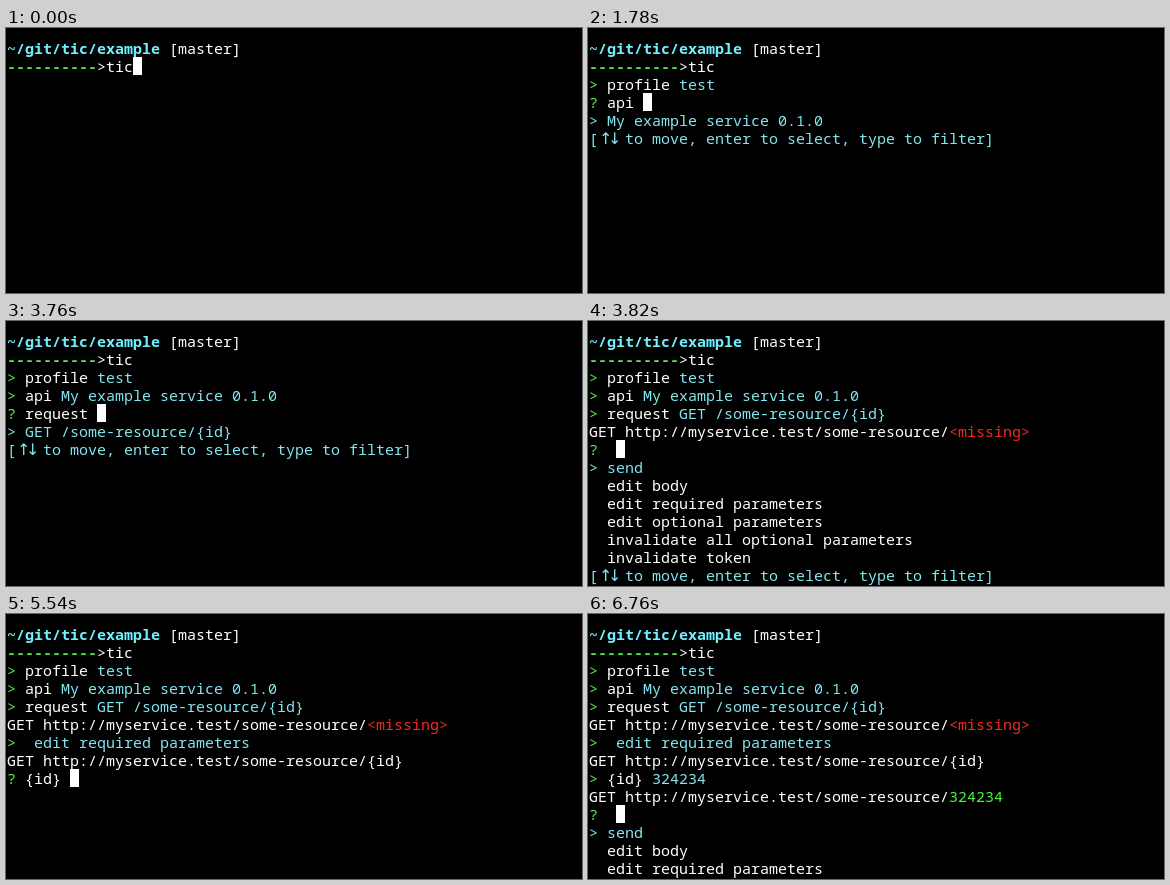
These frames come from a looping animation (576x265 px, 8 s). An HTML page:

```html
<!DOCTYPE html>
<html lang="en">
<head>
<meta charset="utf-8">
<title>Terminal session</title>
<style>
  html, body { margin: 0; width: 100%; height: 100%; overflow: hidden; background: #000; }
  #screen {
    position: absolute; left: 1px; top: 11px; margin: 0;
    font: 500 15px/18px "Noto Sans Mono", "DejaVu Sans Mono", monospace;
    font-variant-ligatures: none; color: #fff; white-space: pre;
  }
  .row { height: 18px; }
  .path { color: #70efff; font-weight: bold; }
  .dash { color: #55f04b; font-weight: bold; }
  .mark { color: #55f04b; }
  .pick { color: #84e6f0; }
  .miss { color: #f52a1e; }
  .value { color: #46f53c; }
  .cursor { display: inline-block; width: 9px; height: 18px; vertical-align: top; background: #fff; }
  .arrow {
    display: inline-block; position: relative; left: 1px; top: 1px;
    width: 9px; height: 18px; vertical-align: top;
    font: 16px/18px "DejaVu Sans", sans-serif;
  }
</style>
</head>
<body>
<pre id="screen"></pre>
<script>
const LOOP = 8000;
const screenEl = document.getElementById("screen");

const escapeText = s => s.replace(/</g, "&lt;").replace(/>/g, "&gt;");
const span = (cls, text = "") => `<span class="${cls}">${escapeText(text)}</span>`;
const cursor = span("cursor");

const asked = (label, answer) => `${span("mark", ">")} ${label} ${span("pick", answer)}`;
const asking = (label, typed = "") => `${span("mark", "?")} ${label} ${typed}${cursor}`;
const list = (items, chosen) => items.map((item, i) =>
  i === chosen ? span("pick", "> " + item) : "  " + item);
const help = span("pick", "[") +
  `<span class="pick">${span("arrow", "↑")}${span("arrow", "↓")}</span>` +
  span("pick", " to move, enter to select, type to filter]");
const url = end => "GET http://myservice.test/some-resource/" + end;

const profiles = ["dev", "test"];
const api = "My example service 0.1.0";
const request = "GET /some-resource/{id}";
const actions = [
  "send", "edit body", "edit required parameters", "edit optional parameters",
  "invalidate all optional parameters", "invalidate token"
];

const shell = [
  span("path", "~/git/tic/example") + " [master]",
  span("dash", "-".repeat(10)) + "&gt;tic"
];
const withProfile = [...shell, asked("profile", "test")];
const withApi = [...withProfile, asked("api", api)];
const withRequest = [...withApi, asked("request", request), url(span("miss", "<missing>"))];
const editing = [...withRequest, asked("", actions[2]), url("{id}")];
const edited = [...editing, asked("{id}", "324234"), url(span("value", "324234"))];

const start = [shell[0], shell[1] + cursor];
const chooseProfile = i => [...shell, asking("profile"), ...list(profiles, i), help];
const chooseAction = (before, i) => [...before, asking(""), ...list(actions, i), help];
const typeId = n => [...editing, asking("{id}", "324234".slice(0, n))];

const steps = [
  [0, start],
  [100, chooseProfile(0)],
  [870, chooseProfile(1)],
  [1270, chooseProfile(0)],
  [1520, chooseProfile(1)],
  [1780, [...withProfile, asking("api"), ...list([api], 0), help]],
  [2800, [...withApi, asking("request"), ...list([request], 0), help]],
  [3820, chooseAction(withRequest, 0)],
  [4680, chooseAction(withRequest, 1)],
  [4820, chooseAction(withRequest, 2)],
  [5050, typeId(0)],
  ...Array.from({ length: 6 }, (_, i) => [5570 + i * 44, typeId(i + 1)]),
  [6410, chooseAction(edited, 0).slice(0, 14)]
];

let shown = null;
function draw(now) {
  const t = now % LOOP;
  const rows = steps.filter(([at]) => at <= t).pop()[1];
  if (rows !== shown) {
    screenEl.innerHTML = rows.map(row => `<div class="row">${row}</div>`).join("");
    shown = rows;
  }
}

const begin = performance.now();
function tick() {
  draw(performance.now() - begin);
  requestAnimationFrame(tick);
}
tick();
</script>
</body>
</html>
```
